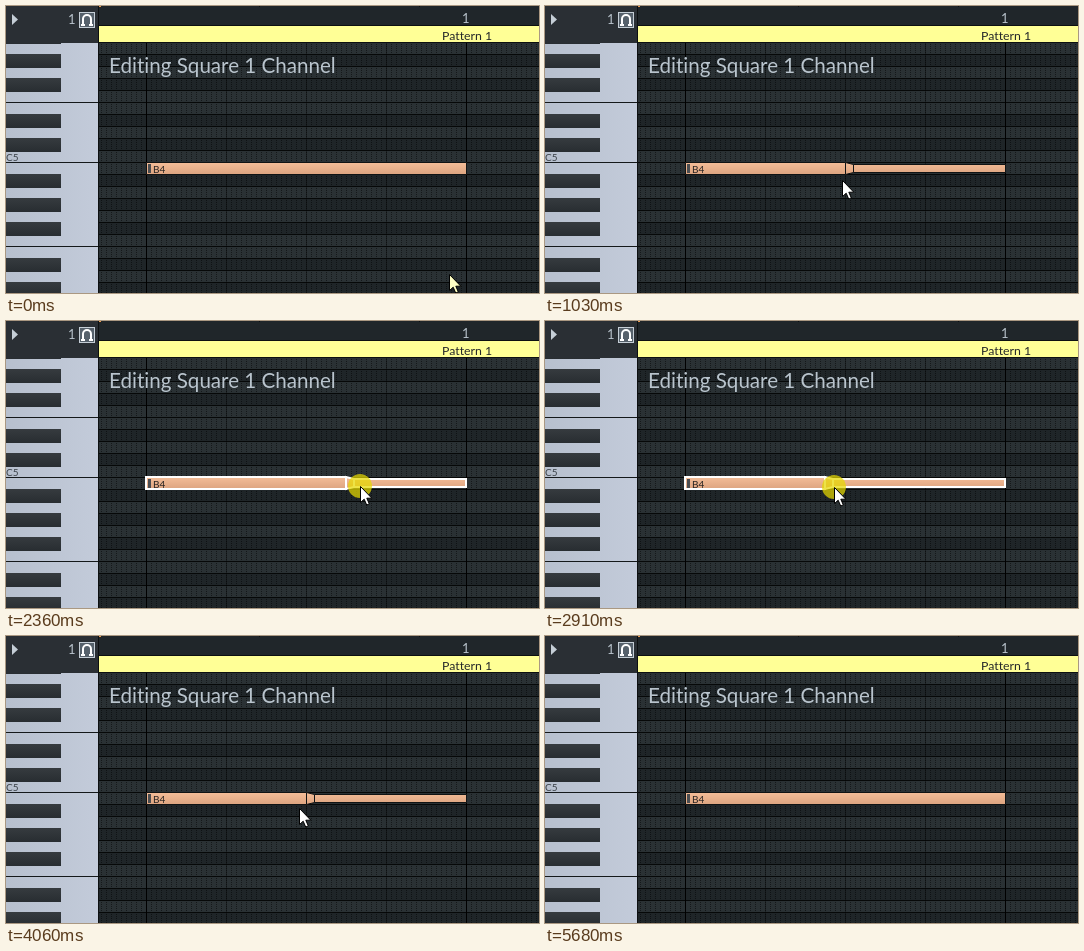
Animation, 533 px wide and 287 px high, one loop 6230 ms. Source, as an HTML page:

```html
<!DOCTYPE html>
<html lang="en">
<head>
<meta charset="utf-8">
<title>Piano roll note release</title>
<style>
  html, body { margin: 0; width: 100%; height: 100%; overflow: hidden; background: #1f2427; }
  svg { display: block; width: 533px; height: 287px; }
  text { font: 13px Lato, sans-serif; font-variant-ligatures: none; fill: #b9c4cd; }
  .crisp { shape-rendering: crispEdges; }
  #note path { fill: url(#skin); stroke: #101314; }
  #note.hot path { stroke: #fff; stroke-width: 2; }
</style>
</head>
<body>
<svg viewBox="0 0 533 287">
  <defs>
    <linearGradient id="skin" gradientUnits="userSpaceOnUse" x1="0" y1="156" x2="0" y2="169">
      <stop stop-color="#f4bd98"/><stop offset="1" stop-color="#dba27e"/>
    </linearGradient>
    <linearGradient id="ivory">
      <stop stop-color="#b7c0ce"/><stop offset="1" stop-color="#c3cbda"/>
    </linearGradient>
    <linearGradient id="ebony" x2="0" y2="1">
      <stop stop-color="#363b3f"/><stop offset="1" stop-color="#282d31"/>
    </linearGradient>
    <pattern id="steps" width="5" height="12" patternUnits="userSpaceOnUse">
      <path d="M.5 0V12" stroke="#000" stroke-opacity=".5" stroke-dasharray="1 1"/>
      <path d="M0 .5H5" stroke="#060808"/>
    </pattern>
  </defs>

  <g class="crisp">
    <rect width="533" height="287" fill="#2a3134"/>
    <g id="rows" fill="#1f2528"></g>
    <rect x="93" y="36" width="440" height="251" fill="url(#steps)"/>
    <path d="M140.5 37V287M460.5 37V287" stroke="#000"/>
    <path d="M220.5 37V287M300.5 37V287M380.5 37V287" stroke="#000" stroke-opacity=".35"/>
    <rect y="37" width="92" height="250" fill="url(#ivory)"/>
    <g id="keys" fill="url(#ebony)"></g>
    <path d="M0 96.5H92M0 156.5H92M0 240.5H92" stroke="#14181a"/>
    <rect width="92" height="37" fill="#2a2f34"/>
    <rect x="93" width="440" height="37" fill="#20262a"/>
    <rect x="93" y="20" width="440" height="16" fill="#ffff96"/>
    <path d="M92.5 0V287M93 36.5H533M93 19.5H533M253.5 0V1M413.5 0V1" stroke="#0d1011"/>
    <rect x="93" width="2" height="1" fill="#e89a50"/>
  </g>

  <path d="M6 8L12 13.5L6 19Z" fill="#c5ced6"/>
  <rect x="73.5" y="6.5" width="15" height="15" fill="#56616b" stroke="#c5ced6"/>
  <path d="M77 20V13a4 4 0 0 1 8 0V20M75 19H79M83 19H87" fill="none" stroke="#fff" stroke-width="2"/>
  <text x="62" y="18">1</text>
  <text x="456" y="17">1</text>
  <text x="436" y="34" style="font-size:12.3px;fill:#25282a">Pattern 1</text>
  <text x="103" y="67" style="font-size:20.6px">Editing Square 1 Channel</text>
  <text y="155" style="font-size:10px;fill:#3a4148">C5</text>

  <g id="note"><path id="tail"/><path id="taper"/><path id="body"/></g>
  <rect class="crisp" x="142" y="158" width="3" height="9" fill="#4b4d50"/>
  <text x="147" y="167" style="font-size:10px;fill:#2a2523">B4</text>

  <g id="pointer">
    <circle id="press" r="12" fill="#e6d800" fill-opacity=".72"/>
    <path id="arrow" d="M.5 .5V16.5L4.2 13.2L6.7 19L9.3 17.9L6.8 12.2H11.8Z" stroke="#000"/>
    <path id="resize" d="M-11 0L-5 -4.5V-1.5H5V-4.5L11 0L5 4.5V1.5H-5V4.5Z" fill="#fff59a" stroke="#5c5208"/>
  </g>
</svg>
<script>
const LOOP = 6230, SPLIT = 850, DRAG = 1740, DROP = 3060, MERGE = 4830;
const ROW = 12, C5_TOP = 144;
const $ = id => document.getElementById(id);

// Pointer gestures: begin and end time, destination
const home = [443, 268];
const moves = [
  [70, 680, 303, 164],     // onto the note
  [880, 1130, 294, 180],   // off after the split
  [1230, 1500, 302, 161],  // back to the edge
  [DRAG, 1970, 160, 162],  // drag left, right, left, middle
  [2050, 2455, 385, 166],
  [2530, 2750, 285, 166],
  [2850, DROP, 303, 165],
  [3300, 3600, 290, 232],  // away and back
  [3830, 4130, 294, 163],
  [4360, 4600, 303, 164],
  [5070, 5680, 509, 290]   // out of view
];

// Sharps are the upper five steps of the circle of fifths that starts at F
const isSharp = semitone => (semitone * 7 + 1) % 12 > 6;

function bars(x, width, height) {
  let out = '';
  for (let y = 24; y < 287; y += ROW) {
    const semitone = ((C5_TOP - y) / ROW + 12) % 12;
    if (isSharp(semitone)) out += `<rect x="${x}" y="${y}" width="${width}" height="${height}"/>`;
  }
  return out;
}
$('rows').innerHTML = bars(93, 440, ROW);
$('keys').innerHTML = bars(0, 55, 14);

const within = (t, from, to) => t >= from && t < to;
const show = (id, on) => $(id).setAttribute('visibility', on ? 'visible' : 'hidden');
const ease = k => k * k * (3 - 2 * k);

function pointerAt(t) {
  let [x, y] = home;
  for (const [from, to, toX, toY] of moves) {
    if (t < from) break;
    const k = ease(Math.min(1, (t - from) / (to - from)));
    x += (toX - x) * k;
    y += (toY - y) * k;
  }
  return [Math.round(x), Math.round(y)];
}

function draw(t) {
  const [x, y] = pointerAt(t);
  const dragging = within(t, DRAG, DROP);
  const hot = dragging || (y < 169 && x < 461);
  const split = within(t, SPLIT, MERGE);
  const end = !split ? 460 : dragging ? Math.floor(x / 20) * 20 : 300;
  const shift = hot ? 0 : .5; // keep strokes on whole pixels

  $('note').setAttribute('class', hot ? 'hot' : '');
  $('note').setAttribute('transform', `translate(${shift} ${shift})`);
  $('body').setAttribute('d', `M140 156H${end}V168H140Z`);
  $('taper').setAttribute('d', split ? `M${end} 156L${end + 8} 158V166L${end} 168Z` : '');
  $('tail').setAttribute('d', split ? `M${end + 8} 158H460V166H${end + 8}Z` : '');

  const moving = within(t, DRAG + 70, DROP);
  $('pointer').setAttribute('transform', `translate(${x} ${y})`);
  $('arrow').setAttribute('fill', t < 70 ? '#ffffc4' : '#fff');
  show('arrow', moving || !hot);
  show('resize', hot && !moving);
  show('press', within(t, SPLIT, 960) || dragging || within(t, MERGE, 4980));
}

const start = performance.now();
function tick() {
  draw((performance.now() - start) % LOOP);
  requestAnimationFrame(tick);
}
tick();
</script>
</body>
</html>
```
